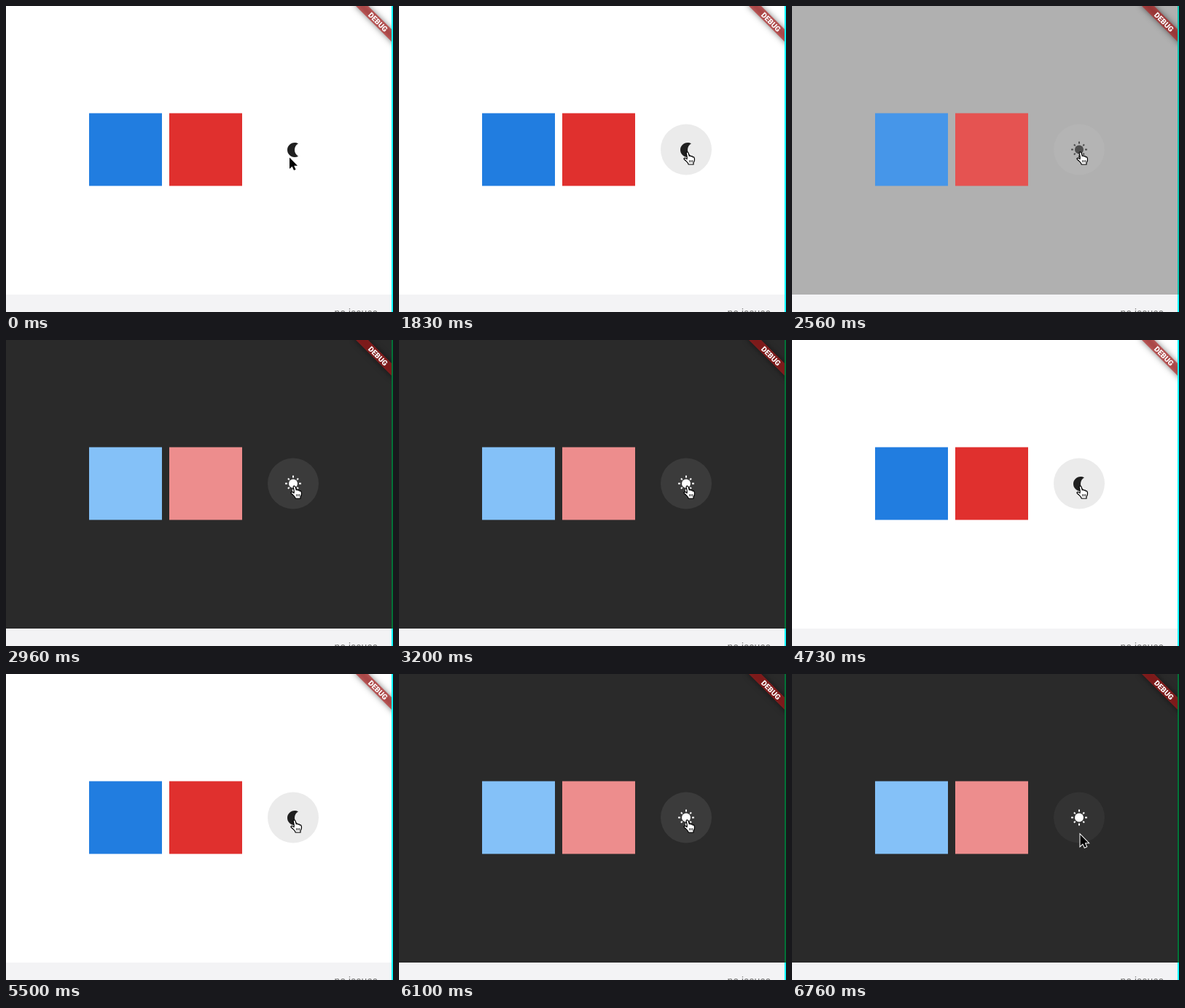
Animation, 531 px wide and 421 px high, one loop 6.8 s. Source, as an HTML page with a canvas:

```html
<!DOCTYPE html>
<html lang="en">
<head>
<meta charset="utf-8">
<title>Theme toggle</title>
<style>
html, body { margin: 0; width: 100%; height: 100%; overflow: hidden; }
canvas { display: block; }
</style>
</head>
<body>
<canvas id="stage" width="531" height="421"></canvas>
<script>
const ctx = document.getElementById('stage').getContext('2d');
const LOOP = 6800, FADE = 110;
const toggles = [2520, 3400, 3820, 4235, 5760];

const moon = new Path2D('M14 2c1.82 0 3.53.5 5 1.35-2.99 1.73-5 4.95-5 8.65s2.01 6.92 5 8.65A9.97 9.97 0 0 1 14 22C8.48 22 4 17.52 4 12S8.48 2 14 2z');
const arrow = new Path2D('M0 0V15.6L3.6 12.2 6 17.6 8.6 16.5 6.2 11.2H11Z');
const hand = new Path2D('M4.3 3Q3.8 1 5.3.8 6.6.7 7.1 2.3L8.3 6.3Q9 5.6 10 6 10.4 6.3 10.7 6.9 11.5 6.3 12.4 6.8 12.9 7.2 13.1 7.9 14 7.4 14.8 8.2 15.6 9.2 15.5 11.5 15.4 13.5 14 15.5V18H7.3Q6.8 16.2 5 14.4 3 12.5 1.3 11 .5 9.8 1.6 9.3 3 8.9 5 10.6 5.8 9.5 4.3 3Z');
const knuckles = new Path2D('M8.6 12v3.2M10.6 12v3.2M12.6 12v3.2');

const mix = (a, b, k) => a + (b - a) * k;
const ramp = (t, from, to) => Math.min(1, Math.max(0, (t - from) / (to - from)));
const blend = (a, b, k) => `rgb(${a.map((v, i) => Math.round(mix(v, b[i], k)))})`;

function rect(color, x, y, w, h) {
  ctx.fillStyle = color;
  ctx.fillRect(x, y, w, h);
}

function at(x, y, draw) {
  ctx.save();
  ctx.translate(x, y);
  draw();
  ctx.restore();
}

function disc(x, y, r, color) {
  ctx.fillStyle = color;
  ctx.beginPath();
  ctx.arc(x, y, r, 0, 2 * Math.PI);
  ctx.fill();
}

function sun(color) {
  disc(0, 0, 6, color);
  for (let i = 0; i < 8; i++) {
    ctx.rotate(Math.PI / 4);
    const start = i % 2 ? 8 : 7.5;
    rect(color, start, -1, i % 2 ? 3 : 2.5, 2);
  }
}

function banner() {
  ctx.rotate(Math.PI / 4);
  ctx.filter = 'blur(4px)';
  rect('rgba(0,0,0,.5)', -40, -6, 80, 12);
  ctx.filter = 'none';
  rect('rgba(183,28,28,.627)', -40, -6, 80, 12);
  ctx.fillStyle = '#fff';
  ctx.font = '900 10.2px Roboto, sans-serif';
  ctx.textAlign = 'center';
  ctx.fillText('DEBUG', 0, 3.7);
}

function cursor(t) {
  const drawArrow = () => {
    ctx.lineWidth = 2;
    ctx.strokeStyle = '#fff';
    ctx.stroke(arrow);
    ctx.fillStyle = '#000';
    ctx.fill(arrow);
  };
  if (t < 30) return at(389, 208.5, drawArrow);
  if (t >= 6730) return at(395.5, 221, drawArrow);
  const y = 200 - 7 * ramp(t, 15, 60) + 7 * ramp(t, 1260, 1530) + 15 * ramp(t, 6600, 6730);
  at(390, y, () => {
    ctx.fillStyle = '#fff';
    ctx.fill(hand);
    ctx.strokeStyle = '#000';
    ctx.lineWidth = 1.2;
    ctx.stroke(hand);
    ctx.lineWidth = .8;
    ctx.stroke(knuckles);
  });
}

function render(t) {
  let dark = 0, press = 0, night = false;
  for (const time of toggles) {
    if (t >= time) {
      night = !night;
      const k = ramp(t, time, time + FADE);
      dark = night ? k : 1 - k;
    }
    press = Math.max(press, ramp(t, time - 200, time) * (1 - ramp(t, time, time + 300)));
  }

  rect(blend([255, 255, 255], [42, 42, 42], dark), 0, 0, 531, 397);
  rect(blend([33, 125, 224], [132, 193, 248], dark), 114, 147.5, 100, 100);
  rect(blend([224, 48, 46], [237, 141, 141], dark), 224, 147.5, 100, 100);

  const hover = ramp(t, 30, 130) * (1 - ramp(t, 6725, 6795));
  const alpha = hover * (mix(.3, .115, dark) + .08 * press);
  disc(394, 197.5, 35, `rgba(188,188,188,${alpha})`);

  const iconColor = blend([32, 32, 32], [255, 255, 255], dark ** 1.6);
  if (night) at(394, 197.5, () => sun(iconColor));
  else at(382, 186, () => {
    ctx.fillStyle = iconColor;
    ctx.fill(moon);
  });

  at(510.5, 22, banner);
  rect('#f3f3f5', 0, 397, 531, 24);
  ctx.fillStyle = '#777';
  ctx.font = '14px Roboto, sans-serif';
  ctx.fillText('no issues', 450.5, 426.5);
  rect('#00faff', 529, 397, 2, 24);
  rect(blend([0, 250, 255], [0, 112, 55], dark), 529, 0, 2, 397);
  cursor(t);
}

const start = performance.now();
function tick() {
  render((performance.now() - start) % LOOP);
  requestAnimationFrame(tick);
}
tick();
</script>
</body>
</html>
```
